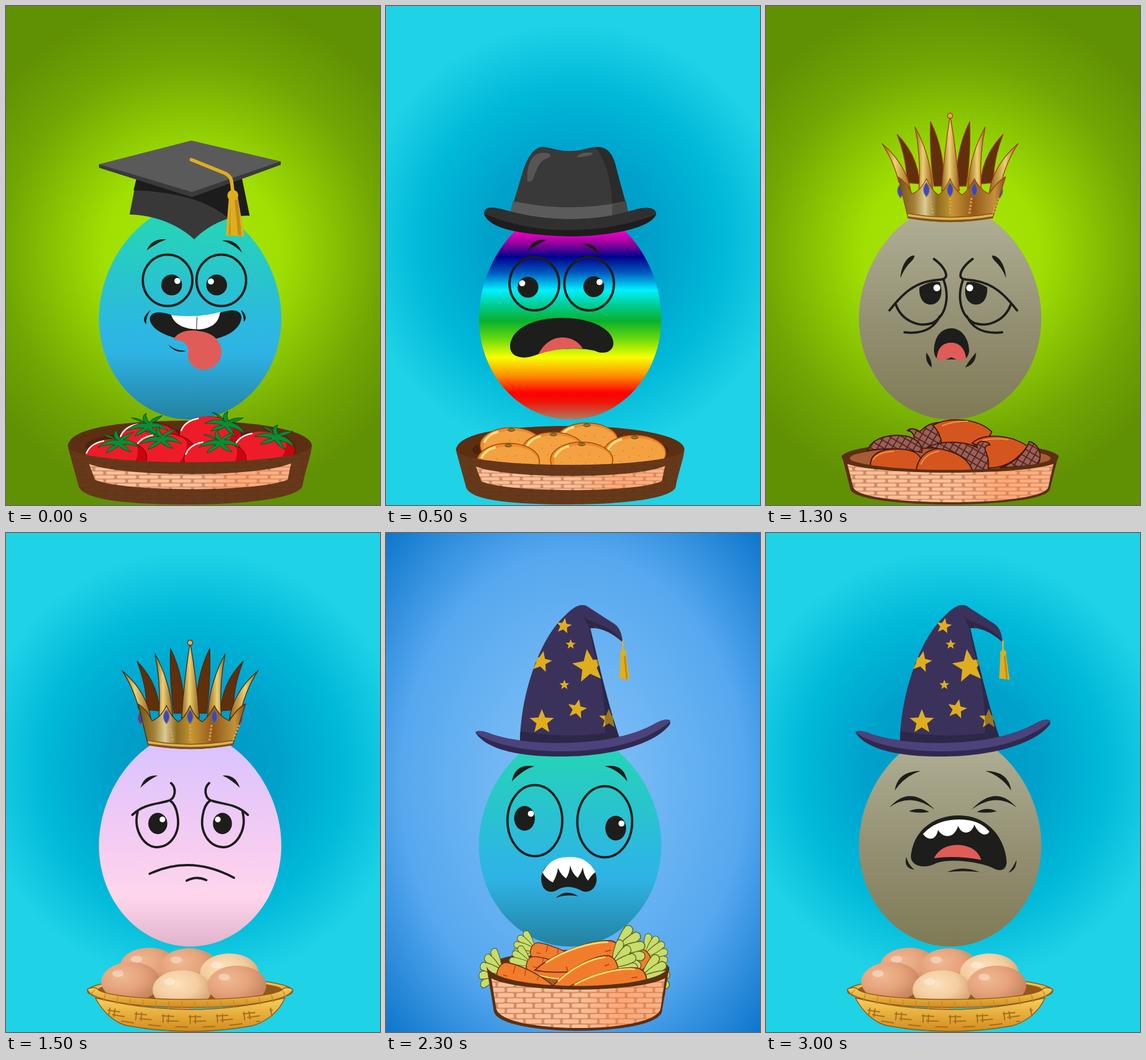
An HTML page without scripts that plays this animation: 648x864 px, repeating every 3.5 s.

```html
<!DOCTYPE html>
<html lang="en">
<head>
<meta charset="utf-8">
<title>Egg costumes</title>
<style>
html, body { margin: 0; height: 100%; overflow: hidden; }
svg { display: block; width: 100%; height: 100%; }
.scene { visibility: hidden; animation: show 3.5s step-end infinite; animation-delay: calc(var(--i) * .5s - 3.5s); }
@keyframes show { 0% { visibility: visible; } 14.2857%, 100% { visibility: hidden; } }
.sky { width: 648px; height: 864px; }
.ink { fill: #1d1d1b; }
.line { fill: none; stroke: #1d1d1b; stroke-width: 4; stroke-linecap: round; }
.white { fill: #fff; }
.white circle { r: 5.3px; }
.tongue { fill: #e05c58; }
.gold { fill: #dfae1e; }
.bark { fill: #5c2f12; }
.weave { fill: url(#weave); }
.glow { fill: url(#glow); }
#crown { stroke: currentColor; stroke-width: 1.4; }
#crown circle { r: 4.5px; fill: #eda45c; }
.leaf { fill: #c9dc6c; stroke: #55661f; stroke-width: 1.5; }
.tan { fill: url(#tan); }
.cream { fill: url(#cream); }
.straw { fill: url(#straw); stroke: #8f5514; stroke-width: 1.5; }
.acorn { stroke: #45180c; stroke-width: 2; fill: #d4561e; }
.shell { fill: url(#hatch); }
.banana { fill: #f8b51d; stroke: #9c5210; stroke-width: 2; }
.shine { fill: none; stroke: #fde566; stroke-width: 11; stroke-linecap: round; }
.stem { fill: #8fc043; stroke: #4d7a22; }
</style>
</head>
<body>
<svg viewBox="0 0 648 864" preserveAspectRatio="none">
<defs>
<radialGradient id="green" gradientUnits="userSpaceOnUse" cx="322" cy="425" r="440">
  <stop stop-color="#a9e900"/><stop offset=".35" stop-color="#a0df03"/><stop offset=".75" stop-color="#70a604"/><stop offset="1" stop-color="#609004"/>
</radialGradient>
<radialGradient id="cyan" gradientUnits="userSpaceOnUse" cx="324" cy="405" r="375">
  <stop stop-color="#0094c2"/><stop offset=".4" stop-color="#00a2cc"/><stop offset=".7" stop-color="#00b9d9"/><stop offset="1" stop-color="#1fd2e6"/>
</radialGradient>
<radialGradient id="blue" r=".707">
  <stop stop-color="#86c3f8"/><stop offset=".65" stop-color="#56a8ef"/><stop offset="1" stop-color="#0d76cc"/>
</radialGradient>
<radialGradient id="mist" gradientUnits="userSpaceOnUse" cx="324" cy="415" r="380">
  <stop stop-color="#aed1d5"/><stop offset=".4" stop-color="#bbd8db"/><stop offset="1" stop-color="#e2eeef"/>
</radialGradient>

<linearGradient id="teal" x2="0" y2="1">
  <stop offset=".12" stop-color="#26d2ba"/><stop offset=".35" stop-color="#29c4cd"/><stop offset=".57" stop-color="#2cb8e0"/><stop offset=".69" stop-color="#2eb3e4"/><stop offset="1" stop-color="#2480a0"/>
</linearGradient>
<linearGradient id="rainbow" x2="0" y2="1">
  <stop offset=".12" stop-color="#f500cd"/><stop offset=".175" stop-color="#9c009c"/><stop offset=".24" stop-color="#00008e"/><stop offset=".315" stop-color="#005abf"/><stop offset=".396" stop-color="#00f0ff"/><stop offset=".46" stop-color="#00cf9c"/><stop offset=".54" stop-color="#08b02e"/><stop offset=".62" stop-color="#64d80e"/><stop offset=".71" stop-color="#f8ff00"/><stop offset=".795" stop-color="#ff9000"/><stop offset=".876" stop-color="red"/><stop offset=".92" stop-color="#ef1608"/><stop offset="1" stop-color="#ad7c64"/>
</linearGradient>
<linearGradient id="stone" x2="0" y2="1">
  <stop offset=".06" stop-color="#afae93"/><stop offset=".56" stop-color="#938f72"/><stop offset="1" stop-color="#7f7a55"/>
</linearGradient>
<linearGradient id="pink" x2="0" y2="1">
  <stop offset=".06" stop-color="#dac3ff"/><stop offset=".54" stop-color="#f6cdf1"/><stop offset=".77" stop-color="#fed6ec"/><stop offset="1" stop-color="#e0b3cb"/>
</linearGradient>
<path id="egg" d="M319 345C400 345 477 440 477 541C477 638 406 716 319 716S161 638 161 541C161 440 238 345 319 345Z"/>

<!-- Hats -->
<g id="cap">
  <path fill="#383838" d="M227 295 214 361C260 362 300 380 326 404C350 380 385 362 422 363L408 295Z"/>
  <path fill="#1c1c1c" d="M227 295 221 319C300 322 350 338 385 367Q400 362 422 363L408 295Z"/>
  <path fill="#3a3a3a" d="M161 274V280L322 331 476 275V269Z"/>
  <path fill="#5a5a5a" d="M161 274 321 233 476 269 322 322Z"/>
  <path fill="none" stroke="#dfae1e" stroke-width="6" stroke-linecap="round" d="M321 266 378 289Q390 294 391 305L393 322"/>
  <path class="gold" d="M386 333 381 397 394 398 413 399 402 333Z"/>
  <path fill="#bf8d1c" d="M396 335 402 397 408 398 402 335ZM389 345 386 396 389 396Z"/>
  <circle class="gold" cx="393" cy="328" r="9.5"/>
</g>
<g id="fedora">
  <path fill="#393939" d="M216 356 236 290Q250 243 273 244C290 246 300 252 322 251C345 250 350 244 370 244Q392 246 400 285L420 358Q320 385 216 356Z"/>
  <path fill="#2b2b2b" d="M363 245Q392 240 400 285L420 358 392 364Q394 285 363 245Z"/>
  <path fill="#5b5b5b" d="M220 338Q320 359 416 338L420 361Q320 385 215 357Z"/>
  <path fill="#464646" d="M392 344 416 338 420 361 392 367Z"/>
  <path fill="#565656" d="M245 303C243 275 252 256 270 254Q290 254 283 262C262 268 262 285 254 301Q248 306 245 303ZM330 262Q336 252 357 254 362 260 330 262Z"/>
  <path fill="#1d1d1d" d="M170 360C170 345 188 349 205 353Q260 369 320 369T430 353C450 347 468 348 468 361C460 382 400 398 320 399C240 397 178 387 170 360Z"/>
  <path fill="#303030" d="M170 360C170 345 188 349 205 353Q260 369 320 369T430 353C450 347 468 348 468 361Q400 387 320 388T170 360Z"/>
</g>

<linearGradient id="metal">
  <stop stop-color="#71541a"/><stop offset=".15" stop-color="#a28134"/><stop offset=".25" stop-color="#dacb93"/><stop offset=".36" stop-color="#8c6b22"/><stop offset=".5" stop-color="#c59632"/><stop offset=".7" stop-color="#94591a"/><stop offset=".9" stop-color="#c1923a"/><stop offset="1" stop-color="#81511c"/>
</linearGradient>
<linearGradient id="spike">
  <stop stop-color="#8b641d"/><stop offset=".45" stop-color="#ecd174"/><stop offset="1" stop-color="#936019"/>
</linearGradient>
<path id="gem" fill="#3e46bd" stroke="#79705f" d="M0-12Q10 0 0 12-10 0 0-12Z"/>
<g id="halfCrown">
  <path fill="#60300c" d="M227 222Q264 260 266 308L244 306Q244 265 227 222ZM285 200Q310 250 308 312H291Q283 260 285 200Z"/>
  <path fill="url(#spike)" d="M201 238Q244 275 251 322L230 305Q222 270 201 238Z"/>
  <path fill="url(#spike)" d="M258 209Q286 260 289 318H265Q269 260 258 209Z"/>
  <use href="#gem" x="233" y="320"/>
  <circle cx="201" cy="238"/><circle cx="227" cy="222"/><circle cx="258" cy="209"/><circle cx="285" cy="200"/>
</g>
<g id="crown">
  <use href="#halfCrown"/><use href="#halfCrown" transform="matrix(-1 0 0 1 638 0)"/>
  <path fill="url(#spike)" d="M319 190Q330 250 335 320H304Q309 250 319 190Z"/>
  <path fill="url(#metal)" d="M229 296 246 366Q319 381 393 366L415 296Q402 302 387 325 372 320 361 299 350 320 340 327 327 320 319 299 310 320 299 327 287 320 278 299 268 320 253 325 243 304 229 296Z"/>
  <g fill="none">
    <path stroke="#81511c" stroke-width="9" d="M246 363Q319 376 393 363"/>
    <path stroke="#dfb34d" stroke-width="4" d="M246 362Q319 375 393 362"/>
    <path stroke="#d6a14e" stroke-width="4" stroke-linecap="round" stroke-dasharray="0 6" d="M284 334 290 362M319 334V362M356 334 352 362M403 334 393 360"/>
  </g>
  <use href="#gem" x="278" y="318"/><use href="#gem" x="319" y="318"/><use href="#gem" x="361" y="318"/>
  <circle cx="319" cy="190"/>
</g>

<path id="star" d="M0-10 2.7-3.4 9.5-3.1 4.2 1.3 5.9 8.1 0 4.3-5.9 8.1-4.2 1.3-9.5-3.1-2.7-3.4Z"/>
<path id="cone" d="M232 360C234 270 270 180 308 145C325 128 335 122 347 126L392 155Q408 163 410 189C395 176 375 163 354 165C365 210 385 300 406 358Q320 376 232 360Z"/>
<clipPath id="coneClip"><use href="#cone"/></clipPath>
<g id="wizard">
  <use href="#cone" fill="#3b325b"/>
  <g clip-path="url(#coneClip)" class="gold">
    <use href="#star" transform="translate(308 161) rotate(10) scale(1.4)"/>
    <use href="#star" transform="translate(320 193) scale(.9)"/>
    <use href="#star" transform="translate(269 223) rotate(12) scale(1.9)"/>
    <use href="#star" transform="translate(352 231) rotate(-8) scale(3)"/>
    <use href="#star" transform="translate(309 263) scale(.9)"/>
    <use href="#star" transform="translate(331 305) rotate(12) scale(1.75)"/>
    <use href="#star" transform="translate(270 327) scale(2.2)"/>
    <use href="#star" transform="translate(386 322) scale(1.75)"/>
    <path fill="#151226" opacity=".35" d="M228 342Q320 360 408 341V380H228ZM342 142C352 160 385 152 412 190L360 160C375 220 385 300 410 360H380Q381 270 360 205L352 165Z"/>
  </g>
  <path fill="#302850" d="M155 346C157 339 175 345 185 349C230 363 290 366 340 362C400 358 440 345 468 329C485 320 495 323 492 331C470 362 400 386 310 387C230 388 175 375 155 346Z"/>
  <path fill="#4c437a" d="M155 346C157 339 175 345 185 349C230 363 290 366 340 362C400 358 440 345 468 329C485 320 495 323 492 327C450 362 385 377 310 378C240 378 190 368 155 346Z"/>
  <path class="gold" d="M409 186H412V204H409ZM406 211 404 252 414 253 422 254 416 211Z"/>
  <path fill="#bd8a16" d="M412 212 416 253H419L415 212Z"/>
  <circle class="gold" cx="411" cy="208" r="5.5"/>
</g>

<!-- Left halves of mirrored faces -->
<g id="weary">
  <path class="ink" d="M233 471C234 450 245 432 257 432Q258 436 252 442 240 453 233 471ZM266 487Q285 475 301 478C309 500 300 517 285 517S264 500 266 487Z"/>
  <path class="line" d="M291 438C305 448 313 460 312 468C310 475 300 473 285 476C255 481 235 500 214 527M225 517C235 545 265 557 288 549C315 535 317 500 308 475M240 565Q286 570 301 537"/>
  <circle class="white" cx="296" cy="488" r="6"/>
</g>
<g id="sad">
  <path class="ink" d="M233 441Q240 418 263 420 249 426 233 441Z"/>
  <path class="line" d="M286 433C296 442 294 461 280 464C262 470 240 468 219 488M228 483C220 515 240 545 262 544C285 543 303 520 297 488Q294 470 284 463"/>
  <ellipse class="ink" cx="263" cy="503" rx="16.5" ry="18.5"/><circle class="white" cx="271" cy="496" r="5"/>
</g>
<g id="happy">
  <path class="ink" d="M234 433Q243 410 270 413 251 418 234 433Z"/>
  <ellipse class="line" cx="270" cy="488" rx="44" ry="47"/>
  <circle class="ink" cx="279" cy="495" r="19"/><circle class="white" cx="269" cy="488" r="5.5"/>
  <path class="line" d="M226 554Q226 544 235 539M229 548Q266 588 320 588"/>
</g>
<path id="crying" class="ink" d="M223 446Q228 412 268 412 240 421 223 446ZM214 475Q250 434 292 479 250 448 214 475ZM248 482Q265 473 283 483 265 486 248 482Z"/>

<!-- Baskets -->
<pattern id="weave" width="38" height="14" patternUnits="userSpaceOnUse">
  <path fill="#cf8a61" d="M0 0H38V14H0Z"/>
  <path stroke="#fabf99" stroke-width="5.5" d="M5 3.5H33M0 10.5H14M24 10.5H38" stroke-linecap="round"/>
</pattern>
<linearGradient id="glow">
  <stop offset=".5" stop-color="#ff8043" stop-opacity="0"/><stop offset=".75" stop-color="#ff8043" stop-opacity=".35"/><stop offset="1" stop-color="#ff8043" stop-opacity=".2"/>
</linearGradient>
<g id="lightBack">
  <ellipse class="bark" cx="319" cy="781" rx="188" ry="26"/>
  <ellipse cx="319" cy="783" rx="174" ry="20" fill="#a65c35"/>
</g>
<path id="lightBody" d="M141 793C200 813 440 813 498 793L489 833C480 868 160 868 151 833Z"/>
<g id="lightFront">
  <path class="bark" d="M131 777C150 812 488 812 507 777L492 836C488 872 150 872 146 836Z"/>
  <use href="#lightBody" class="weave"/><use href="#lightBody" class="glow"/>
</g>
<path id="band" d="M144 793C200 815 430 818 494 792L488 820C440 842 200 842 154 820Z"/>
<path id="darkBody" d="M107 763C125 799 515 799 530 762C528 780 517 810 514 830C510 850 430 863 318 863S135 855 126 832Z"/>
<g id="darkBack">
  <path class="bark" d="M107 763C108 730 200 718 318 718S530 735 530 762L510 790H130Z"/>
  <ellipse cx="319" cy="762" rx="182" ry="29" fill="#4a240c"/>
</g>
<g id="darkFront">
  <use href="#darkBody" class="bark"/><use href="#darkBody" class="weave" opacity=".07"/>
  <use href="#band" class="weave"/><use href="#band" class="glow"/>
</g>

<!-- Basket contents -->
<path id="calyx" fill="#0b8c35" stroke="#0a4f1c" d="M0-4Q-20-7-36 8-16 2-6 4-18 8-22 18-6 12 0 5 8 14 22 16 14 8 8 3 22 2 36 8 24-6 8-5 18-9 26-18 8-14 3-6-4-16-2-22-12-16-5-6-14-14-28-14-16-8 0-4Z"/>
<g id="tomato">
  <ellipse rx="54" ry="31" fill="#c90510" stroke="#5e0508"/>
  <path fill="#ee1c28" d="M-53 0C-50-38 20-38 38-17Q42 10 12 31C-30 31-53 18-53 0Z"/>
  <path fill="none" stroke="#fff" stroke-width="2.5" d="M-51-6Q-44-24-20-28"/>
</g>
<g id="orange">
  <ellipse rx="54" ry="31" fill="#ee8a2c" stroke="#9a4a0c" stroke-width="1.5"/>
  <ellipse cx="2" cy="2" rx="50" ry="28" fill="#f4a142"/>
  <path fill="none" stroke="#ffe081" stroke-width="4" d="M-47-5Q-40-20-22-24"/>
  <path fill="none" stroke="#d5791f" stroke-width="2" stroke-linecap="round" stroke-dasharray="0 17" d="M-35 4Q0-18 38-4M-25 14Q0-2 40 10"/>
  <ellipse cy="-27" rx="6" ry="2.5" fill="#98762b" stroke="#5d3a0b"/>
</g>
<pattern id="hatch" width="11" height="11" patternUnits="userSpaceOnUse" patternTransform="rotate(30)">
  <path fill="#99605a" stroke="#57251c" stroke-width="2" d="M0 0H11V11H0Z"/>
</pattern>
<radialGradient id="tan" cx=".35" cy=".35" r=".75"><stop stop-color="#f0b992"/><stop offset=".5" stop-color="#e5a27a"/><stop offset="1" stop-color="#be7d57"/></radialGradient>
<radialGradient id="cream" cx=".4" cy=".35" r=".75"><stop stop-color="#fde1bd"/><stop offset=".5" stop-color="#f3cc9f"/><stop offset="1" stop-color="#cd945f"/></radialGradient>
<linearGradient id="straw" x2="0" y2="1"><stop stop-color="#f7cf5a"/><stop offset="1" stop-color="#d38b1f"/></linearGradient>
<g id="henEgg"><ellipse rx="51" ry="34"/><ellipse cx="-22" cy="-14" rx="10" ry="6" fill="#fff" opacity=".35"/></g>
<g id="eggs">
  <ellipse class="straw" cx="319" cy="793" rx="178" ry="24"/>
  <ellipse cx="319" cy="791" rx="160" ry="17" fill="#94581a"/>
  <g class="tan"><use href="#henEgg" x="248" y="752"/><use href="#henEgg" x="317" y="753"/></g>
  <use href="#henEgg" x="387" y="762" class="cream"/>
  <use href="#henEgg" x="216" y="777" class="tan"/>
  <use href="#henEgg" x="305" y="791" class="cream"/>
  <use href="#henEgg" x="400" y="783" class="tan"/>
  <path class="straw" d="M155 805C170 835 195 850 210 853Q319 873 428 853C450 846 473 830 483 805Q319 845 155 805Z"/>
  <g fill="none" stroke="#a86b19">
    <path stroke-width="15" stroke-dasharray="2 7 2 36" d="M178 829Q319 855 462 829"/>
    <path stroke-width="2" stroke-dasharray="22 25" d="M176 826Q319 849 462 826M184 834Q319 857 450 834M200 845Q319 866 440 845"/>
  </g>
  <path class="straw" d="M141 790C150 832 488 832 497 790Q490 786 481 788C470 814 168 814 157 788Q147 786 141 790Z"/>
  <path fill="none" stroke="#c58525" stroke-width="13" stroke-dasharray="1.5 21" d="M150 794C180 826 460 826 489 794"/>
</g>
<path id="frond" class="leaf" d="M0-4Q25-10 44-7 52 0 44 7 25 10 0 4Z"/>
<g id="carrot">
  <use href="#frond" transform="translate(138) rotate(-48)"/><use href="#frond" transform="translate(138) rotate(48)"/>
  <use href="#frond" transform="translate(138) rotate(-24)"/><use href="#frond" transform="translate(138) rotate(24)"/>
  <use href="#frond" x="138"/>
  <path fill="#f17d2c" stroke="#6f2d10" stroke-width="2" d="M0 0C30-18 100-29 133-19C149-13 149 13 133 19C100 24 35 16 0 0Z"/>
  <path fill="none" stroke="#fbdc69" stroke-width="3" d="M20-8C55-21 100-25 128-18"/>
  <path fill="none" stroke="#c93f14" stroke-width="2" d="M110 19 109 4M85 18 82 7M52 13V6M120-4H130"/>
</g>
<filter id="sticker">
  <feMorphology in="SourceAlpha" operator="dilate" radius="5" result="wide"/>
  <feFlood flood-color="#fff"/><feComposite in2="wide" operator="in" result="rim"/>
  <feDropShadow in="rim" dx="7" dy="2" stdDeviation="1" flood-color="#899294" result="base"/>
  <feMerge><feMergeNode in="base"/><feMergeNode in="SourceGraphic"/></feMerge>
</filter>
</defs>

<g class="scene" style="--i:0">
  <rect class="sky" fill="url(#green)"/>
  <use href="#egg" fill="url(#teal)"/>
  <use href="#cap"/>
  <path class="ink" d="M244 423Q252 402 278 404 261 410 244 423ZM374 406Q400 403 409 427 393 411 374 406ZM251 526Q232 541 243 551 242 538 251 526ZM407 526Q421 538 412 547 412 537 407 526ZM281 586Q294 598 313 597 293 603 281 586Z"/>
  <g class="line"><ellipse cx="280" cy="475" rx="43" ry="44.5"/><ellipse cx="373" cy="475" rx="43" ry="44.5"/></g>
  <g class="ink"><circle cx="287" cy="483" r="18"/><circle cx="365" cy="483" r="18"/></g>
  <g class="white"><circle cx="297" cy="476"/><circle cx="355" cy="477"/></g>
  <path class="ink" d="M249 541C252 525 275 531 287 535Q330 541 371 531C395 523 408 527 408 540C405 565 370 580 330 580C285 578 250 562 249 541Z"/>
  <path class="white" d="M286 535Q330 541 371 530 368 557 335 560 295 560 286 535Z"/>
  <path stroke="#1d1d1b" d="M331 538 330 560"/>
  <path class="tongue" d="M291 576C300 562 320 560 335 563C365 566 376 588 373 604C368 625 350 632 336 629C320 625 313 612 316 598C316 584 305 578 291 578Z"/>
  <use href="#darkBack"/>
  <use href="#tomato" x="249" y="752"/><use href="#calyx" x="245" y="727"/>
  <use href="#tomato" x="354" y="742"/><use href="#calyx" transform="translate(381 724) rotate(15)"/>
  <use href="#tomato" x="275" y="771"/>
  <use href="#tomato" x="447" y="768"/><use href="#calyx" transform="translate(467 747) rotate(15)"/>
  <use href="#tomato" x="190" y="781"/><use href="#calyx" x="195" y="756"/><use href="#calyx" x="268" y="750"/>
  <use href="#tomato" x="362" y="783"/><use href="#calyx" x="370" y="756"/>
  <use href="#darkFront"/>
</g>

<g class="scene" style="--i:1">
  <rect class="sky" fill="url(#cyan)"/>
  <use href="#egg" fill="url(#rainbow)"/>
  <use href="#fedora"/>
  <path class="ink" d="M246 424Q254 401 279 405 265 411 246 424ZM339 412Q364 408 370 433 357 417 339 412Z"/>
  <g class="line"><ellipse cx="257" cy="481" rx="43" ry="46"/><ellipse cx="352" cy="481" rx="43" ry="46"/></g>
  <g class="ink"><circle cx="246" cy="487" r="18"/><circle cx="360" cy="486" r="18"/></g>
  <g class="white"><circle cx="236" cy="480"/><circle cx="370" cy="478"/></g>
  <path class="ink" d="M215 590C215 562 250 540 305 540C360 540 395 562 394 585C393 600 375 604 362 597C340 592 325 593 305 594C280 594 262 605 247 608C228 611 215 603 215 590Z"/>
  <path class="tongue" d="M264 603C275 582 290 574 305 574C325 574 335 584 341 593Q300 591 264 603Z"/>
  <use href="#darkBack" transform="matrix(.936 0 0 .936 21 55.2)"/>
  <use href="#orange" x="217" y="761"/><use href="#orange" x="348" y="753"/>
  <use href="#orange" x="290" y="769"/><use href="#orange" x="431" y="774"/>
  <use href="#orange" x="212" y="788"/><use href="#orange" x="339" y="786"/>
  <use href="#darkFront" transform="matrix(.936 0 0 .936 21 55.2)"/>
</g>

<g class="scene" style="--i:2">
  <rect class="sky" fill="url(#green)"/>
  <use href="#egg" fill="url(#stone)"/>
  <use href="#crown" color="#a0410f"/>
  <use href="#weary"/><use href="#weary" transform="matrix(-1 0 0 1 649 0)"/>
  <path class="ink" d="M291 598C291 574 303 558 321 558S352 576 352 598Q350 610 343 612H300Q292 610 291 598ZM278 600Q275 616 287 626 288 613 278 600ZM364 600Q364 620 345 626 353 612 364 600Z"/>
  <path class="tongue" d="M296 611C297 590 308 583 321 583C335 583 345 592 347 612Q335 616 321 608 310 615 296 611Z"/>
  <use href="#lightBack"/>
  <g class="acorn">
    <path class="shell" d="M252 766Q264 739 245 735 252 728 267 737 280 722 300 721L310 765Z"/>
    <path d="M289 726C315 712 365 712 391 737C388 750 370 756 350 765L305 760Q302 738 289 726Z"/>
    <path class="shell" d="M456 754C478 760 478 785 470 795L405 800Q445 785 456 754Z"/>
    <path d="M357 757C375 740 420 740 453 762C440 780 420 800 385 800Q385 765 357 757Z"/>
    <path class="shell" d="M175 770C185 745 220 740 245 745C262 750 272 760 270 773Q220 762 175 770Z"/>
    <path d="M181 796C180 775 200 766 230 767C255 768 268 775 270 790V806H190Z"/>
    <path d="M260 806C262 785 275 768 300 766C340 768 360 785 357 808Z"/>
    <path class="shell" d="M279 764C310 750 350 755 366 765 362 750 385 752 388 760 378 760 378 768 382 774Q388 790 384 806H358C352 785 330 768 279 764Z"/>
    <path fill="none" stroke="#f39642" d="M185 786Q194 772 222 771M268 794Q277 774 300 771M305 727Q325 718 350 719M375 752Q395 747 420 751"/>
  </g>
  <use href="#lightFront"/>
</g>

<g class="scene" style="--i:3">
  <rect class="sky" fill="url(#cyan)"/>
  <use href="#egg" fill="url(#pink)"/>
  <use href="#crown" color="#4a2a10"/>
  <use href="#sad"/><use href="#sad" transform="matrix(-1 0 0 1 638 0)"/>
  <path class="line" d="M249 590Q320 557 395 597M313 602Q330 593 347 601"/>
  <use href="#eggs"/>
</g>

<g class="scene" style="--i:4">
  <rect class="sky" fill="url(#blue)"/>
  <use href="#egg" fill="url(#teal)"/>
  <use href="#wizard"/>
  <path class="ink" d="M218 430Q224 398 257 404 238 409 218 430ZM379 404Q412 398 418 430 401 409 379 404ZM294 632Q312 615 333 629 312 625 294 632Z"/>
  <g class="line"><ellipse cx="258" cy="498" rx="47.5" ry="61.5"/><ellipse cx="379" cy="500" rx="47.5" ry="61.5"/></g>
  <g class="ink"><ellipse cx="240" cy="494" rx="18" ry="21.5"/><ellipse cx="398" cy="511" rx="18" ry="21.5"/></g>
  <g class="white"><circle cx="251" cy="486"/><circle cx="408" cy="503"/></g>
  <path class="ink" d="M269 600C268 575 295 562 320 562C348 562 365 580 365 600C364 618 350 624 340 620Q315 606 295 619C280 626 269 615 269 600Z"/>
  <path class="white" d="M271 588C285 564 300 561 320 561C342 561 355 572 363 587Q356 592 350 602 343 594 341 579 338 589 332 597 323 590 319 576 318 589 312 598 303 592 298 580 296 594 289 605 278 600 271 588Z"/>
  <use href="#lightBack" transform="matrix(.843 0 0 1.3 63.6 -260)"/>
  <use href="#carrot" transform="translate(355 752) rotate(197) scale(.75)"/>
  <use href="#carrot" transform="translate(360 795) rotate(-35) scale(.8)"/>
  <use href="#carrot" transform="translate(350 768) rotate(192) scale(.75)"/>
  <use href="#carrot" transform="translate(258 757) rotate(-13) scale(1.05)"/>
  <use href="#carrot" transform="translate(285 790) rotate(-21) scale(.85 1)"/>
  <use href="#carrot" transform="translate(298 792) rotate(198) scale(.76 .95)"/>
  <use href="#carrot" transform="translate(308 793) rotate(-9)"/>
  <use href="#lightFront" transform="matrix(.843 0 0 1.3 63.6 -260)"/>
</g>

<g class="scene" style="--i:5">
  <rect class="sky" fill="url(#mist)"/>
  <use href="#egg" fill="url(#pink)"/>
  <use href="#cap"/>
  <use href="#happy"/><use href="#happy" transform="matrix(-1 0 0 1 638 0)"/>
  <path class="ink" d="M303 606Q319 613 335 606 319 624 303 606Z"/>
  <g filter="url(#sticker)">
    <use href="#lightBack" x="-4" y="-8"/>
    <g class="banana">
      <path class="stem" d="M190 744 185 731 198 727 212 734 204 747ZM400 738 395 718 406 713 420 720 414 740ZM154 754 150 738 162 733 174 739 170 754Z"/>
      <path d="M186 750C190 738 208 738 220 748C250 766 290 760 305 772L235 786C205 778 186 768 186 750Z"/>
      <path class="shine" d="M202 752Q230 770 275 772"/>
      <path d="M312 715Q320 714 321 722C318 745 320 760 326 768H268C255 755 255 738 268 727Q285 715 312 715Z"/>
      <path class="shine" d="M308 726Q287 740 296 762"/>
      <path d="M384 742C390 727 425 725 434 742C436 760 415 785 366 782C385 768 380 752 384 742Z"/>
      <path class="shine" d="M408 741Q408 760 388 771"/>
      <path d="M146 764C150 746 172 744 180 755C190 770 220 780 235 800L165 798C148 786 143 775 146 764Z"/>
      <path class="shine" d="M162 762Q176 780 208 790"/>
      <path d="M216 782C270 775 320 765 343 742C355 733 377 735 378 748C370 780 320 802 230 799Z"/>
      <path class="shine" d="M238 788Q300 783 334 772"/>
      <path class="stem" d="M472 753 473 738 484 732 496 739 488 755ZM346 740Q354 733 363 736L357 742ZM307 715H320V722Z"/>
      <path d="M308 778C370 775 420 772 450 752C470 740 490 746 490 760C480 795 380 808 312 796Z"/>
      <path class="shine" d="M332 785Q415 783 467 759"/>
      <path class="stem" d="M308 778Q316 774 323 779L312 785Z"/>
    </g>
    <use href="#lightFront" x="-4" y="-8"/>
  </g>
</g>

<g class="scene" style="--i:6">
  <rect class="sky" fill="url(#cyan)"/>
  <use href="#egg" fill="url(#stone)"/>
  <use href="#wizard"/>
  <use href="#crying"/><use href="#crying" transform="matrix(-1 0 0 1 648 0)"/>
  <path class="ink" d="M251 560C255 515 290 489 335 489C385 489 415 530 417 570C416 585 405 586 395 581C370 568 310 562 290 574C270 582 251 575 251 560ZM314 587Q340 575 370 587 340 584 314 587ZM243 561Q238 580 257 583 247 575 243 561ZM434 566Q434 584 420 588 428 580 434 566Z"/>
  <path class="white" d="M272 521Q295 496 335 496 370 496 387 517C382 527 368 522 361 505C355 524 338 522 333 507C325 532 305 527 298 514C295 533 280 533 272 521Z"/>
  <path class="tongue" d="M291 563Q303 540 333 540 365 542 373 566 330 558 291 563Z"/>
  <use href="#eggs"/>
</g>
</svg>
</body>
</html>
```
